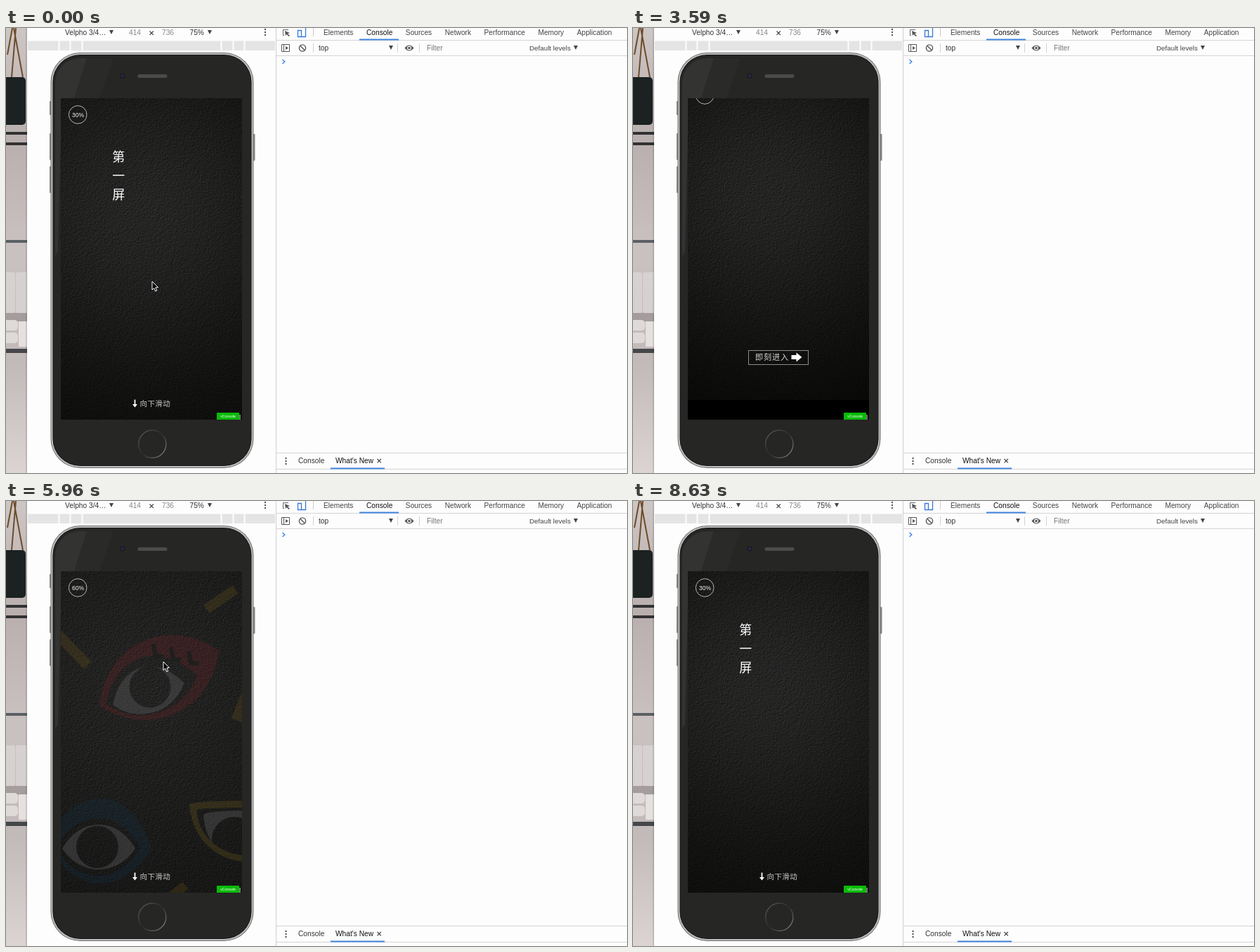
Recreate the animation shown at these times as an HTML page with a canvas. Size 884 by 634 pixels, loop 8730 ms.

```html
<!DOCTYPE html>
<html lang="en">
<head>
<meta charset="utf-8">
<title>Swipe pages</title>
<style>
html, body { margin: 0; width: 100%; height: 100%; overflow: hidden; background: #fdfdfd; }
canvas { display: block; }
</style>
</head>
<body>
<canvas id="stage" width="884" height="634"></canvas>
<script>
const W = 884, H = 634, LOOP = 8730, STEP = 148.78, START = 295;
const SX = 78, SY = 100, SW = 258, SH = 458;
const UI = '"Liberation Sans", Arial, sans-serif';
const CJK = '"Noto Sans CJK SC", "Noto Sans CJK", sans-serif';
const ctx = document.getElementById('stage').getContext('2d');

function layer(w, h, paint) {
  const c = document.createElement('canvas');
  c.width = w;
  c.height = h;
  paint(c.getContext('2d'));
  return c;
}

function rect(g, x, y, w, h, color) {
  g.fillStyle = color;
  g.fillRect(x, y, w, h);
}

function round(g, x, y, w, h, r, color) {
  g.fillStyle = color;
  g.beginPath();
  g.roundRect(x, y, w, h, r);
  g.fill();
}

function poly(g, pts, color) {
  g.beginPath();
  for (let i = 0; i < pts.length; i += 2) g.lineTo(pts[i], pts[i + 1]);
  g.closePath();
  g.fillStyle = color;
  g.fill();
}

function disc(g, x, y, r, color) {
  g.beginPath();
  g.arc(x, y, r, 0, Math.PI * 2);
  g.fillStyle = color;
  g.fill();
}

function ring(g, x, y, r, color, width = 1) {
  g.beginPath();
  g.arc(x, y, r, 0, Math.PI * 2);
  g.strokeStyle = color;
  g.lineWidth = width;
  g.stroke();
}

function path(g, d, color, width) {
  g.strokeStyle = color;
  g.lineWidth = width;
  g.stroke(new Path2D(d));
}

function label(g, str, x, y, color = '#333', size = 10.2, family = UI, align = 'left') {
  g.font = size + 'px ' + family;
  g.textAlign = align;
  g.fillStyle = color;
  g.fillText(str, x, y);
}

const down = (g, x, y) => poly(g, [x - 3, y - 3, x + 3, y - 3, x, y + 3], '#444');
const cross = (g, x, y) =>
  path(g, `M${x - 2.7} ${y - 2.7}l5.4 5.4m0 -5.4l-5.4 5.4`, '#444', 1.2);

function dots(g, x, y) {
  for (const d of [-4, 0, 4]) disc(g, x, y + d, 1.2, '#555');
}

// Blurred kitchen wall visible beside the window
function paintWall(g) {
  const wall = g.createLinearGradient(0, 0, 0, H);
  ['#cdc6c4', '#b9afae', '#cac1c1', '#c2b9b9', '#dcd4d3']
    .forEach((c, i) => wall.addColorStop(i / 4, c));
  rect(g, 0, 0, 30, H, wall);
  path(g, 'M9 0L2 38M11 0L24 70M14 0L8 70', '#6d4c2b', 2);
  round(g, -8, 70, 36, 68, 5, '#1c2122');
  for (const y of [148, 163]) rect(g, 0, y, 30, 4, '#323133');
  rect(g, 0, 302, 30, 4, '#5b6065');
  for (const x of [-4, 14]) round(g, x, 348, 17, 58, 3, 'rgba(232,227,227,.5)');
  rect(g, 0, 406, 30, 12, '#a59d9d');
  for (const y of [416, 434]) round(g, -6, y, 23, 15, 5, '#dfdad9');
  rect(g, 18, 418, 12, 36, '#e6e0df');
  rect(g, 0, 457, 30, 6, '#46474a');
  rect(g, 28, 0, 2, H, 'rgba(0,0,0,.12)');
}

function paintTools(g) {
  label(g, 'Velpho 3/4…', 84, 9.5);
  down(g, 150, 6);
  label(g, '414', 175, 9.5, '#888');
  cross(g, 207.2, 7.2);
  label(g, '736', 222, 9.5, '#888');
  label(g, '75%', 261.5, 9.5);
  down(g, 290, 6);
  dots(g, 369, 6);

  // Ruler, mirrored around the phone
  rect(g, 31, 18.5, 352, 13.5, '#e4e4e4');
  for (const d of [99, 116, 132]) for (const side of [-1, 1]) {
    rect(g, 206.5 + side * d, 18, 2, 15, '#fdfdfd');
  }
  rect(g, 384, 0, 1, H, '#cfcfcf');
  for (const y of [17, 39, 605, 628]) rect(g, 385, y, 499, 1, '#d4d4d4');

  path(g, 'M402 2.5H394.5V10.5H396', '#666', 1);
  poly(g, [397, 4, 404, 7, 401, 8, 404, 11, 402.5, 12, 399.5, 9, 398, 11], '#555');
  path(g, 'M419.5 -1H426.5V12.5H421M415.5 3.5H420.5V12.5H415.5Z', '#3879d9', 1.3);
  rect(g, 437, 0, 1, 12, '#ccc');
  let x = 452;
  for (const tab of ['Elements', 'Console', 'Sources', 'Network', 'Performance', 'Memory', 'Application']) {
    label(g, tab, x, 9.5, tab === 'Console' ? '#111' : '#444');
    x += g.measureText(tab).width + 18.5;
  }
  rect(g, 503, 15.5, 56, 2, '#4285e0');

  path(g, 'M392.5 23.5H403.5V33.5H392.5ZM395.5 23.5V33.5', '#555', 1);
  poly(g, [398, 26, 402, 28.5, 398, 31], '#555');
  ring(g, 422, 28.5, 4.6, '#555', 1.4);
  path(g, 'M418.8 25.3l6.4 6.4', '#555', 1.4);
  for (const bar of [437, 557, 588]) rect(g, bar, 22, 1, 13, '#d2d2d2');
  label(g, 'top', 445, 32);
  down(g, 548, 28);
  g.fillStyle = '#555';
  g.fill(new Path2D('M567.5 28.5Q574 20.5 580.5 28.5Q574 36.5 567.5 28.5Z'));
  disc(g, 574, 28.5, 3, '#fdfdfd');
  disc(g, 574, 28.5, 1.8, '#555');
  label(g, 'Filter', 599, 32, '#777');
  label(g, 'Default levels', 745, 31.5, '#444', 9.8);
  down(g, 811, 28);
  path(g, 'M393.5 45l3.3 3l-3.3 3', '#3d83e6', 1.4);

  dots(g, 398.5, 617);
  label(g, 'Console', 416, 620);
  label(g, "What's New", 469, 620, '#111');
  cross(g, 531.2, 616.7);
  rect(g, 462, 626.5, 77, 2, '#4285e0');
}

function paintPhone(g) {
  for (const [x, y, h] of [[62, 104, 20], [62, 150, 38], [62, 197, 38], [350.5, 151, 38]]) {
    round(g, x, y, 4, h, 1, '#858585');
  }
  ['#6e6e6e', '#bdbdbd', '#bdbdbd', '#161616', '#262625'].forEach((c, i) =>
    round(g, 63.5 + i, 35 + i, 289 - 2 * i, 592 - 2 * i, 42 - i, c));
  g.save();
  g.beginPath();
  g.roundRect(70, 43, 276, 576, 35);
  g.clip();
  poly(g, [115, 43, 153, 43, 133, 100, 97, 100], '#2a2a29');
  poly(g, [70, 43, 115, 43, 97, 100, 78, 152, 74, 318, 70, 325], '#333332');
  g.restore();
  disc(g, 166, 68, 4, '#1d1d1f');
  disc(g, 166, 68, 2, '#272754');
  round(g, 187.5, 66, 42, 5, 2.5, '#4b4b4a');
  const rim = g.createLinearGradient(194, 579, 222, 607);
  ['#535352', '#2b2b2a', '#777775'].forEach((c, i) => rim.addColorStop(i / 2, c));
  ring(g, 208.3, 592.8, 19.6, rim, 1.3);
}

const backdrop = layer(W, H, g => {
  rect(g, 0, 0, W, H, '#fdfdfd');
  paintWall(g);
  paintTools(g);
  paintPhone(g);
});

// Embossed noise under a soft pool of light
function leather(hi, lo) {
  let seed = 7;
  const n = SW + 3;
  const field = Float32Array.from({ length: n * (SH + 3) }, () =>
    (seed = (seed * 16807) % 2147483647) / 2147483647);
  const soft = i => (field[i] + field[i + 1] + field[i + n] + field[i + n + 1]) / 4;
  return layer(SW, SH, g => {
    const img = g.createImageData(SW, SH);
    for (let y = 0, p = 0; y < SH; y++) for (let x = 0; x < SW; x++, p += 4) {
      const i = y * n + x;
      const light = lo + (hi - lo) * Math.exp(-(((x - 115) / 240) ** 2) - ((y - 160) / 235) ** 2);
      const v = light * (1 + .8 * (soft(i) - soft(i + n + 1)));
      img.data.set([v + 1, v + .6, v, 255], p);
    }
    g.putImageData(img, 0, 0);
  });
}

// Two tips joined by an upper and a lower arc
function almond(x, y, half, up, low, tilt = 0, bulge = .5) {
  const c = half * bulge, p = new Path2D(), shape = new Path2D();
  p.moveTo(-half, 0);
  p.bezierCurveTo(-c, -up * 4 / 3, c, -up * 4 / 3, half, 0);
  p.bezierCurveTo(c, low * 4 / 3, -c, low * 4 / 3, -half, 0);
  shape.addPath(p, new DOMMatrix().translate(x, y).rotate(tilt * 180 / Math.PI));
  return shape;
}

function eye(g, color, outer, hole, white, px, py, r) {
  outer.addPath(hole);
  g.fillStyle = color;
  g.fill(outer, 'evenodd');
  g.save();
  g.clip(white);
  const iris = new Path2D();
  iris.rect(0, 0, W, H);
  iris.arc(px, py, r, 0, Math.PI * 2);
  g.fillStyle = 'rgba(100,98,100,.36)';
  g.fill(iris, 'evenodd');
  g.restore();
}

function bar(g, x, y, len, width, angle) {
  g.save();
  g.translate(x, y);
  g.rotate(angle);
  rect(g, -len / 2, -width / 2, len, width, 'rgba(130,98,25,.21)');
  g.restore();
}

function paintEyes(g) {
  g.translate(-SX, -SY);
  bar(g, 306, 140, 50, 14, -.6);
  bar(g, 92, 209, 70, 15, .8);
  bar(g, 336, 293, 42, 16, 1.95);
  bar(g, 246, 555, 24, 13, -.65);
  eye(g, 'rgba(135,34,40,.21)', almond(218, 252, 94, 57, 56, -.43),
    almond(207, 269, 68, 48, 34, -.3), almond(203, 275, 53, 39, 27, -.3), 205, 265, 29.5);
  for (let i = 0; i < 3; i++) {
    path(g, `M${210 + 25 * i} ${204 + 5 * i}l3 17h11`, '#1f1f1e', 6);
  }
  eye(g, 'rgba(15,55,85,.22)', almond(133, 488, 75, 64, 57, .1),
    almond(131, 494, 60, 42, 40), almond(132, 495, 52, 34, 30), 130, 493, 30);
  eye(g, 'rgba(128,108,28,.23)', almond(345, 432, 84, 5, 82, 0, .9),
    almond(345, 440, 74, 3, 65, 0, .9), almond(338, 447, 57, 6, 65, 0, .9), 325, 482, 32);
}

const pages = [leather(36, 9), leather(34, 20), leather(35, 4)];
paintEyes(pages[1].getContext('2d'));

function spaced(str, x, y, pitch, color, size) {
  [...str].forEach((c, i) => label(ctx, c, x + i * pitch, y, color, size, CJK));
}

function drawPage(i, dy, sx = 1) {
  ctx.save();
  ctx.translate(SX + SW / 2, SY + dy);
  ctx.scale(sx, 1);
  ctx.translate(-SW / 2, 0);
  ctx.drawImage(pages[i], 0, 0);
  ctx.translate(-SX, -SY);
  ring(ctx, 102.2, 123.5, 12.8, '#b8b8b8');
  label(ctx, ['30%', '60%', '100%'][i], 102.6, 126.6, '#f2f2f2', 8.5, UI, 'center');
  if (i === 0) {
    [...'第一屏'].forEach((c, n) => label(ctx, c, 160.3, 189.5 + 27 * n, '#fff', 18, CJK, 'center'));
  }
  if (i < 2) {
    path(ctx, 'M183.5 529.5V538', '#fff', 1.8);
    poly(ctx, [180, 536, 187, 536, 183.5, 540.5], '#fff');
    spaced('向下滑动', 190.5, 538.5, 10.9, '#c8c8c8', 10.6);
  } else {
    ctx.strokeStyle = '#8c8c8c';
    ctx.lineWidth = 1;
    ctx.strokeRect(164.5, 487.5, 85, 20);
    spaced('即刻进入', 174, 501.3, 12, '#d4d4d4', 11.2);
    rect(ctx, 225.5, 494, 7.5, 6, '#fff');
    poly(ctx, [232.5, 490.5, 240.5, 497, 232.5, 503.5], '#fff');
  }
  ctx.restore();
}

// Each swipe drags the pointer from a to b between two steps
const swipes = [
  { from: 0, to: 1, press: 0, release: 8, a: [208, 361], b: [224, 26] },
  { from: 1, to: 2, press: 15, release: 22, a: [172, 472], b: [212, -14] },
  { from: 2, to: 1, press: 30, release: 33, a: [224, 170], b: [228, 580] },
  { from: 1, to: 0, press: 39, release: 43, a: [224, 229], b: [226, 556] }
];
const exit = { press: 50, a: [900, 450] };

function glide(a, b, u) {
  u = Math.min(1, Math.max(0, u));
  const e = u * u * (3 - 2 * u);
  return a.map((v, i) => v + (b[i] - v) * e);
}

const dragged = (s, k) => glide(s.a, s.b, (k - s.press) / (s.release - s.press));

function pointer(k) {
  const i = swipes.findLastIndex(s => s.press <= k);
  if (i < 0) return swipes[0].a;
  const s = swipes[i], next = swipes[i + 1] || exit;
  if (k <= s.release) return dragged(s, k);
  return glide(s.b, next.a, (k - s.release) / (next.press - 1 - s.release));
}

function drawScreen(k) {
  const s = swipes.findLast(w => w.press <= k);
  if (!s) return drawPage(0, 0);
  const dir = s.to > s.from ? -1 : 1;
  let d = dir * (dragged(s, k)[1] - s.a[1]);
  const left = Math.min(1, Math.max(0, 1 - (k - s.release) / 3));
  d = SH + (d - SH) * left * left;
  drawPage(s.from, dir * d / 3, 1 - .4 * d / SH);
  drawPage(s.to, dir * (d - SH));
}

function drawTouch(x, y) {
  disc(ctx, x, y, 9, 'rgba(20,20,20,.8)');
  ring(ctx, x, y, 9, '#9b9b9b', 1.4);
}

function drawArrow(x, y) {
  ctx.save();
  ctx.translate(x, y);
  poly(ctx, [0, 0, 0, 12, 2.8, 9.6, 4.7, 14, 6.8, 13.1, 4.9, 8.8, 8.5, 8.6], '#000');
  ctx.strokeStyle = '#fff';
  ctx.lineWidth = 1;
  ctx.stroke();
  ctx.restore();
}

function draw(t) {
  const k = Math.max(-1, Math.floor((t - START) / STEP));
  const [x, y] = pointer(k);
  const touching = y > SY - 5 && y < SY + SH && swipes.some(s => k > s.press && k <= s.release);
  ctx.drawImage(backdrop, 0, 0);
  ctx.save();
  ctx.beginPath();
  ctx.rect(SX, SY, SW, SH);
  ctx.clip();
  rect(ctx, SX, SY, SW, SH, '#000');
  drawScreen(k);
  round(ctx, 300, 548, 32, 10.5, 1, '#09bb07');
  label(ctx, 'vConsole', 316, 555, '#fff', 5.2, UI, 'center');
  rect(ctx, 332.5, 551, 1, 7, '#ddd');
  if (touching) drawTouch(x, y);
  ctx.restore();
  if (!touching) drawArrow(x, y);
}

const begin = performance.now();
function tick() {
  draw((performance.now() - begin) % LOOP);
  requestAnimationFrame(tick);
}
tick();
</script>
</body>
</html>
```
